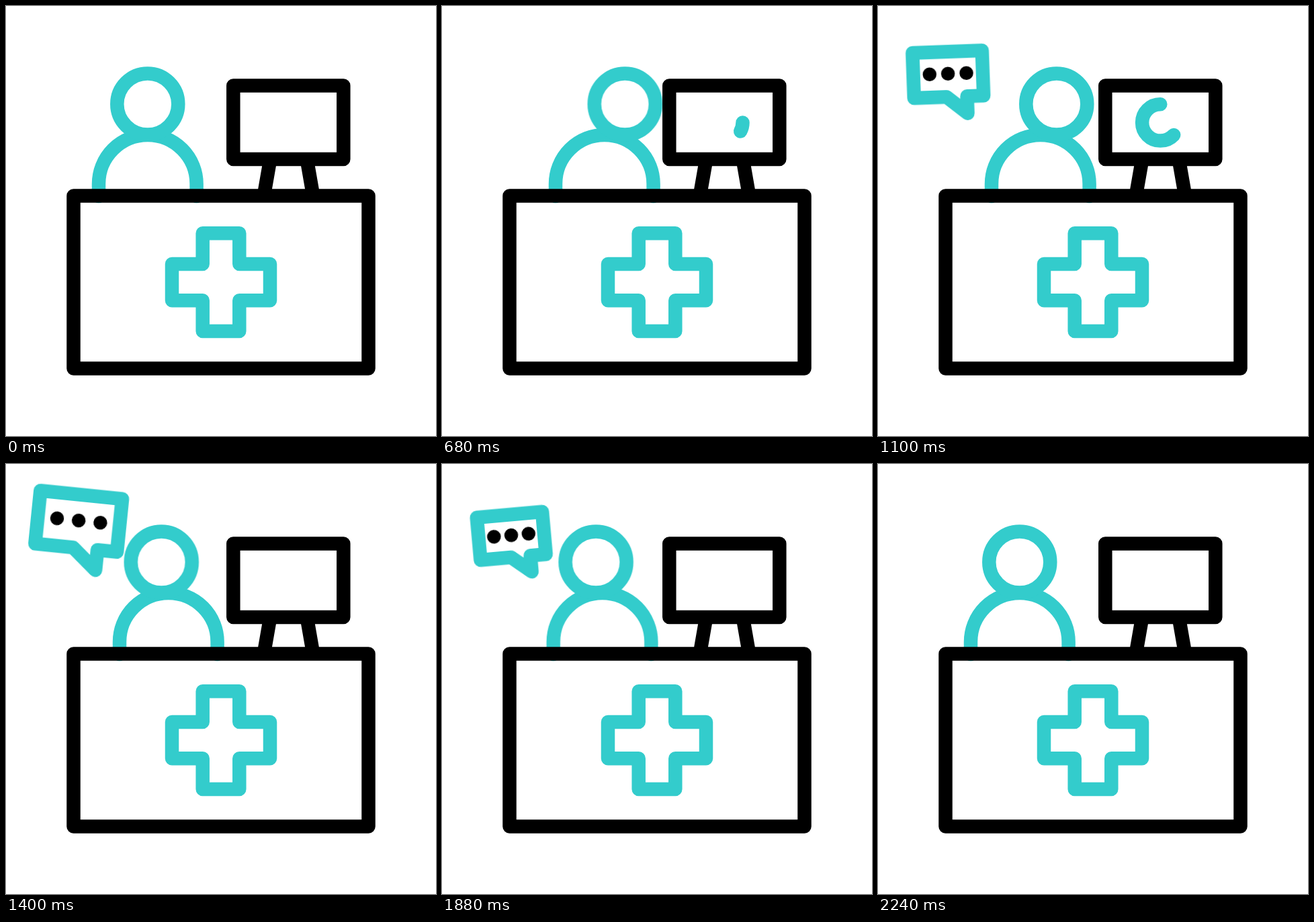
An HTML page for the animation above (2.4 s loop, 640 px wide and 640 px high).

```html
<!DOCTYPE html>
<html lang="en">
<head>
<meta charset="utf-8">
<title>Reception desk</title>
<style>
  html, body { margin: 0; width: 100%; height: 100%; overflow: hidden; background: #fff; }
  svg { display: block; width: 100%; height: 100%; }
  path, rect, circle { fill: none; stroke-width: 20.5px; stroke-linecap: round; stroke-linejoin: round; }
  .teal { stroke: #3cc; }
  .black { stroke: #000; }
  .legs { stroke-linecap: butt; }

  .move { animation: 2400ms cubic-bezier(.333, 0, .667, 1) infinite; }
  .body { animation-name: body; }
  .head { animation-name: head; }

  .spinner {
    stroke-dasharray: 100 900;
    animation: spin 2400ms cubic-bezier(.333, 0, .667, 1) infinite,
               spin-show 2400ms step-end infinite;
  }
  .bubble {
    transform-origin: 0 0;
    animation: pop 2400ms cubic-bezier(.333, 0, .667, 1) infinite,
               tilt 2400ms cubic-bezier(.333, 0, .667, 1) infinite,
               bubble-show 2400ms step-end infinite;
  }
  .bubble path { vector-effect: non-scaling-stroke; }

  @keyframes body {
    0%, 8.333% { transform: translateX(0); }
    25%, 75% { transform: translateX(31px); }
    91.667%, 100% { transform: translateX(0); }
  }
  @keyframes head {
    0%, 8.333% { transform: translateX(0); }
    25%, 41.667% { transform: translateX(61.5px); }
    58.333%, 75% { transform: translateX(20.5px); }
    91.667%, 100% { transform: translateX(0); }
  }
  /* the arc grows from its start, then shrinks towards its end */
  @keyframes spin {
    0%, 25% { stroke-dashoffset: 100; }
    41.667% { stroke-dashoffset: 0; }
    58.333%, 100% { stroke-dashoffset: -100; }
  }
  @keyframes spin-show {
    0% { visibility: hidden; }
    25.1% { visibility: visible; }
    58.333%, 100% { visibility: hidden; }
  }
  @keyframes pop {
    0%, 33.333% { scale: 0; }
    50%, 73.333% { scale: 1; }
    90.833%, 100% { scale: 0; }
  }
  @keyframes tilt {
    0%, 33.333% { rotate: -13.5deg; }
    50% { rotate: 0deg; }
    56.04% { rotate: 7.8deg; }
    66.25% { rotate: -7.2deg; }
    75.833% { rotate: -4.4deg; }
    90.833%, 100% { rotate: -13.5deg; }
  }
  @keyframes bubble-show {
    0% { visibility: hidden; }
    33.4% { visibility: visible; }
    90.833%, 100% { visibility: hidden; }
  }
</style>
</head>
<body>
<svg viewBox="0 0 640 640">
  <path class="teal move body" d="M138 283V264.8a72.8 72.8 0 0 1 145.6 0V283"/>
  <circle class="teal move head" cx="210.8" cy="146" r="45.5"/>

  <path class="black legs" d="M392.6 232L384.4 279M448.4 232L456.6 279"/>
  <rect class="black" x="338.3" y="118.6" width="164" height="109.4"/>
  <path class="teal spinner" pathLength="100" d="M447.5 173.4a27.2 27.2 0 1 1-27.2-27.2"/>

  <rect class="black" x="100.5" y="282.5" width="439" height="257"/>
  <path class="teal" d="M292.7 338.2H347.3V384H393V438.3H347.3V484H292.7V438.3H247V384H292.7Z"/>

  <g transform="translate(140 163.5)">
    <g class="bubble">
      <path class="teal" d="M-100.7-114.2H21.6V-34.9H-7.5V-4.8L-43.8-34.9H-100.7Z"/>
      <path class="black" d="M-72-75.7h.01M-39.7-75.7h.01M-7.3-75.7h.01"/>
    </g>
  </g>
</svg>
</body>
</html>
```
